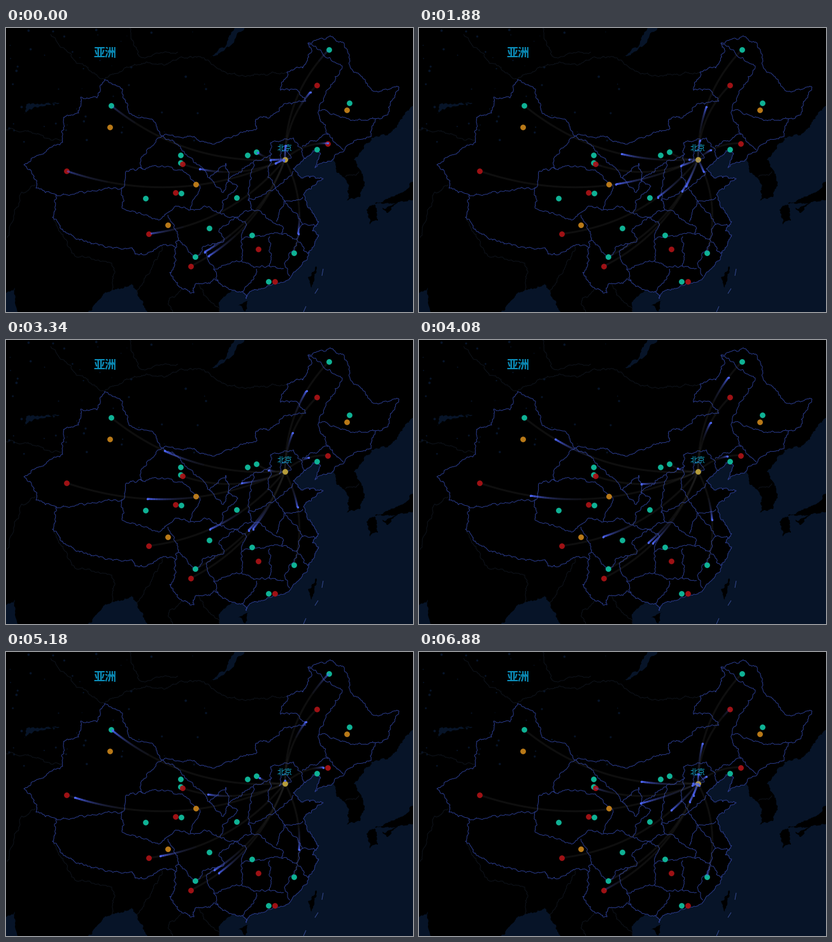
A matplotlib script for the animation above (6960 ms loop, 639 by 447 pixels).

```python
import numpy as np
import matplotlib.pyplot as plt
from matplotlib.animation import FuncAnimation
from matplotlib.collections import LineCollection
from matplotlib.patches import Polygon

W, H = 639, 447
LOOP, STEP = 6960, 40       # ms
PERIOD = 5630               # ms for one flight
FADE, TAIL = 410, 1300      # ms

SEA, BORDER, FAINT = '#071428', '#293a88', '#0e131b'
GREEN, RED, ORANGE = '#10bd9e', '#a81216', '#c48019'
HUB = np.array([438, 206.5])

rng = np.random.default_rng(8)


def rough(*xy, amp=.26, reach=10, step=3):
    """Join key points by a fractal line (midpoint displacement)."""
    pts = np.array(xy, float).reshape(-1, 2)
    while True:
        a, b = pts[:-1], pts[1:]
        size = np.hypot(*(b - a).T)[:, None]
        if size.max() < step:
            return pts
        push = rng.uniform(-amp, amp, size.shape) * np.minimum(1, reach / (size + 1e-9))
        out = np.empty((2 * len(pts) - 1, 2))
        out[::2], out[1::2] = pts, (a + b) / 2 + push * (b - a)[:, ::-1] * (1, -1)
        pts = out


fig = plt.figure(figsize=(W / 72, H / 72), dpi=72, facecolor='black')
ax = fig.add_axes([0, 0, 1, 1])
ax.set(xlim=(0, W), ylim=(H, 0))
ax.axis('off')


def fill(pts, color=SEA, z=1):
    ax.add_patch(Polygon(pts, fc=color, lw=0, zorder=z))


def strokes(lines, color, z, width=1, **kw):
    ax.add_collection(LineCollection(lines, colors=color, linewidths=width,
                                     zorder=z, **kw))


# --- seas, lakes, islands ---
korea = rough(645, 118, 622, 143, 602, 166, 574, 173, 546, 207, 563, 242,
              556, 266, 535, 272, 536, 244, 520, 228, 515, 205)
coast = rough(515, 205, 485, 220, 494, 198, 482, 193, 462, 212, 451, 222,
              463, 236, 482, 233, 498, 237, 467, 262, 481, 291, 491, 305,
              481, 319, 491, 326, 475, 358, 445, 394, 416, 405, 382, 416,
              377, 426, 372, 415, 359, 413)
tonkin = rough(359, 413, 337, 428, 335, 450)
fill(np.vstack([korea, coast, tonkin, [(645, 450)]]))
fill(rough(127, 450, 154, 418, 197, 402, 223, 450))
fill(rough(-3, 420, 14, 408, 20, 450, -3, 450))
fill(rough(320, 46, 345, 28, 360, -2, 374, -2, 350, 30, 320, 46))
fill(rough(28, 135, 32, 120, 84, 118, 45, 124, 28, 135))
ponds = rng.uniform((0, 0), (320, 180), (50, 2))
ax.scatter(*ponds.T, s=rng.uniform(1, 4, 50) ** 2, c=SEA, lw=0, zorder=1)

for island in [(487, 375, 474, 393, 480, 409, 487, 375),
               (364, 437, 382, 428, 376, 446, 364, 437),
               (566, 286, 579, 278, 584, 303, 571, 309, 566, 286),
               (579, 276, 632, 252, 645, 236, 645, 272, 579, 276),
               (591, 283, 613, 275, 598, 291, 591, 283)]:
    fill(rough(*island), 'black', 2)

# --- national border ---
borders = [
    coast,
    rough(28, 215, 51, 200, 89, 180, 93, 139, 114, 134, 117, 109, 143, 110,
          155, 81, 183, 98, 194, 135, 235, 150, 246, 170, 298, 173, 326, 183,
          352, 173, 394, 158, 392, 144, 414, 141, 440, 119, 471, 115),
    rough(471, 115, 458, 98, 431, 98, 441, 70, 466, 63, 480, 35, 474, 24,
          506, 14, 528, 22, 546, 70, 580, 100, 616, 92, 599, 137, 580, 143,
          573, 171, 539, 183, 515, 205),
    rough(359, 413, 333, 397, 297, 403, 295, 417, 276, 410, 257, 385, 267, 365,
          266, 346, 245, 342, 222, 355, 203, 356, 198, 346, 173, 345, 137, 340,
          90, 320, 73, 298, 78, 262, 47, 252, 40, 226, 28, 215)]


def border(*xy):
    borders.append(rough(*xy))


# --- provinces, west to east ---
border(78, 262, 125, 259, 183, 251, 190, 225, 214, 222, 212, 208, 246, 170)
border(214, 222, 246, 217, 280, 227, 305, 252, 290, 286)
border(183, 251, 183, 284, 241, 302, 265, 281, 290, 286)
border(254, 294, 270, 325, 266, 346)
border(270, 334, 296, 364, 314, 343, 342, 336, 334, 320, 359, 298)
border(290, 286, 311, 280, 336, 291, 359, 298, 386, 286, 415, 302, 434, 312)
border(246, 170, 280, 195, 320, 236, 345, 213, 350, 230, 341, 259, 320, 236)
border(348, 240, 364, 249, 340, 272, 336, 291)
border(348, 240, 388, 212, 417, 198, 415, 181, 451, 173, 471, 205)
border(388, 212, 380, 271, 386, 286)
border(417, 198, 411, 235, 423, 252, 437, 272, 429, 290, 425, 305)
border(429, 211, 436, 192, 448, 204, 429, 211)
border(380, 271, 411, 257, 423, 252, 451, 225)
border(466, 266, 437, 272, 455, 291, 466, 309, 488, 312)
border(466, 309, 456, 332, 467, 350, 477, 354)
border(457, 337, 437, 371, 445, 391)
border(434, 312, 434, 325, 456, 332)
border(434, 325, 395, 327, 370, 333, 376, 305, 359, 298)
border(414, 328, 414, 375, 436, 379)
border(414, 375, 389, 377, 370, 366, 370, 333)
border(370, 366, 326, 380, 315, 356, 328, 340)
border(326, 380, 333, 397)
border(393, 379, 389, 395, 372, 415)
border(465, 187, 506, 167, 530, 192)
border(506, 167, 491, 130, 528, 60, 474, 24)
border(491, 130, 545, 145, 580, 143)
strokes(borders, BORDER, 4)
strokes([[(498, 379), (496, 390)], [(490, 410), (485, 418)],
         [(471, 438), (467, 447)]], '#34498f', 4)

# --- faint neighbouring borders ---
strokes([rough(*xy) for xy in [
    (155, 81, 202, 57, 260, 52, 299, 46, 347, 72, 441, 70),
    (155, 81, 110, 55, 70, 10),
    (89, 178, 50, 166, 0, 160),
    (46, 246, 25, 258, 2, 330),
    (73, 298, 110, 360, 166, 370, 166, 413),
    (245, 342, 230, 375, 205, 419),
    (276, 410, 255, 430, 262, 447),
    (303, 402, 310, 420, 336, 447),
    (533, 234, 554, 226),
    (194, 0, 210, 45, 270, 38)]], FAINT, 3)

# --- cities; a flight leaves the hub for each one with a start time in ms ---
flights = [(507, 34, GREEN, -603), (488, 90, RED, 635), (505, 181.5, RED, 25),
           (392.5, 194.5, GREEN, 300), (165, 122, GREEN, -432),
           (95, 225, RED, -258), (276.5, 214, RED, 935), (224, 324, RED, -70),
           (290, 375, RED, 768), (297, 360, GREEN, 415), (452, 354, GREEN, 1110)]
others = {
    GREEN: [(539, 118), (488, 191), (379, 200), (274, 200), (274, 212), (275, 260),
            (219, 268), (362, 267), (319, 315), (386, 326), (412, 399)],
    RED: [(266, 259), (396, 348), (422, 399)],
    ORANGE: [(163, 156), (535, 129), (298, 246), (254, 310)],
    '#bfa43c': [HUB]}


def curve(end, t):
    end, t = np.array(end), np.asarray(t)[:, None]
    dx, dy = end - HUB
    ctrl = (HUB + end) / 2 + .2 * np.array([dy, -dx])
    return (1 - t) ** 2 * HUB + 2 * t * (1 - t) * ctrl + t ** 2 * end


def dots(pts, color):
    ax.scatter(*np.transpose(pts), s=8.8 ** 2, c=color, lw=0, alpha=.95, zorder=6)


strokes([curve(f[:2], np.linspace(0, 1, 40)) for f in flights], '#5a5a5a', 5,
        width=3, alpha=.16)
for color, pts in others.items():
    dots(pts, color)
for x, y, color, _ in flights:
    dots([(x, y)], color)

font = dict(family='Noto Sans CJK JP', ha='center', va='center_baseline', zorder=7)
ax.text(155.5, 37.5, '亚洲', size=18, color='#0b8cb8', weight='bold', **font)
ax.text(437.5, 188, '北京', size=12, color='#14a8cc', **font)

# --- comets ---
ages = np.linspace(0, TAIL, 20)
glow = np.exp(-(ages[:-1] + ages[1:]) / 2 / FADE)
tails = ax.add_collection(LineCollection([], linewidths=3, zorder=8))
heads = ax.scatter([], [], s=3.4 ** 2, c='#4d66f2', lw=0, zorder=9)


def update(i):
    segs, alphas, tips = [], [], []
    for x, y, _, start in flights:
        t = ((i * STEP - start - ages) / PERIOD) % 1
        pts = curve((x, y), t)
        keep = t[:-1] > t[1:]     # skip the jump back to the hub
        segs.extend(np.stack([pts[:-1], pts[1:]], axis=1)[keep])
        alphas.extend(glow[keep])
        tips.append(pts[0])
    tails.set_segments(segs)
    tails.set_color([(.29, .38, .97, a) for a in alphas])
    heads.set_offsets(tips)
    return tails, heads


anim = FuncAnimation(fig, update, frames=LOOP // STEP, interval=STEP,
                     repeat=True, repeat_delay=0)
plt.show()
```
